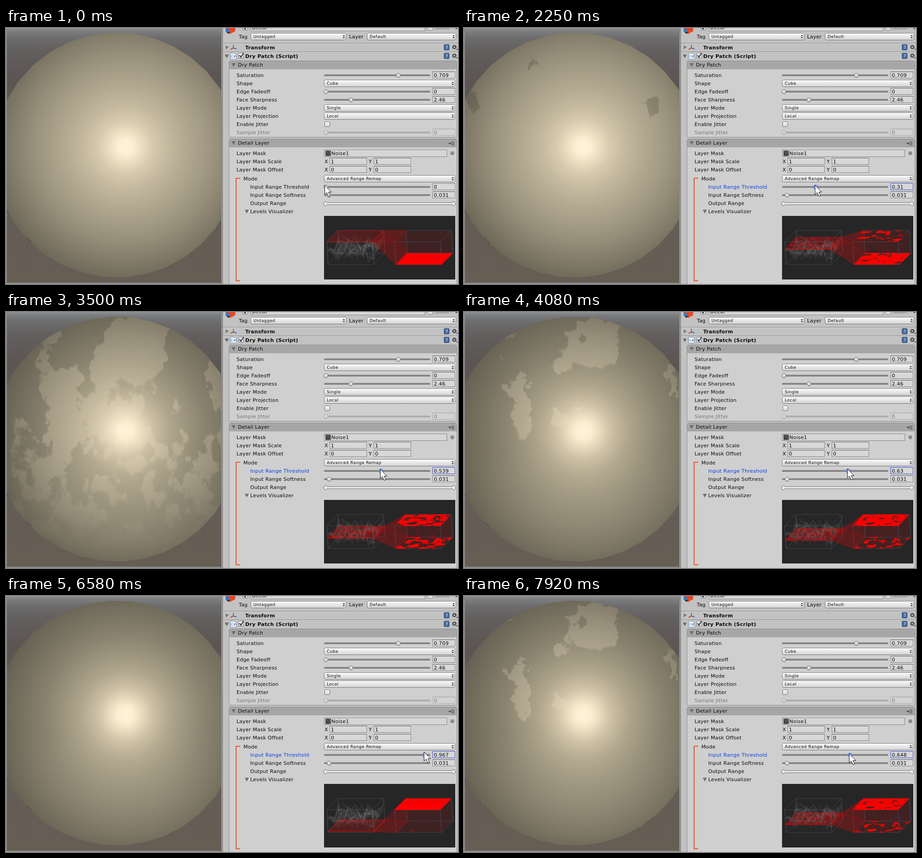
Recreate the animation shown at these times as an HTML page with a canvas. Size 992 by 564 pixels, loop 8 s.

```html
<!DOCTYPE html>
<html lang="en">
<head>
<meta charset="utf-8">
<title>Range remap inspector</title>
<style>
html, body { margin: 0; width: 100%; height: 100%; overflow: hidden; background: #c2c2c2; }
canvas, svg { position: absolute; left: 0; top: 0; }
#levels { left: 698px; top: 414px; }
text { font: 11px "DejaVu Sans", sans-serif; letter-spacing: .23px; fill: #0a0a0a; white-space: pre; }
.bold { font-weight: bold; letter-spacing: .3px; }
.mini { font-size: 9px; letter-spacing: .5px; }
.light { fill: #fff; }
.off { opacity: .45; }
.active text { fill: #0c3fdc; }
</style>
</head>
<body>
<canvas id="scene" width="474" height="564"></canvas>
<svg id="panel" width="992" height="564">
  <defs>
    <linearGradient id="btn" x2="0" y2="1"><stop stop-color="#fcfcfc"/><stop offset="1" stop-color="#d2d2d2"/></linearGradient>
    <linearGradient id="knob" x2="0" y2="1"><stop stop-color="#f6f6f6"/><stop offset="1" stop-color="#c4c4c4"/></linearGradient>
  </defs>
</svg>
<canvas id="levels" width="288" height="140"></canvas>
<script>
const $ = id => document.getElementById(id);
const clamp = (x, a = 0, b = 1) => Math.min(b, Math.max(a, x));
const mix = (a, b, k) => a + (b - a) * k;

// ---------- noise ----------
function hash(x, y) {
  const s = Math.sin(x * 127.1 + y * 311.7) * 43758.5453;
  return s - Math.floor(s);
}
function noise(x, y) {
  const i = Math.floor(x), j = Math.floor(y), u = x - i, v = y - j;
  const a = u * u * (3 - 2 * u), b = v * v * (3 - 2 * v);
  return mix(mix(hash(i, j), hash(i + 1, j), a), mix(hash(i, j + 1), hash(i + 1, j + 1), a), b);
}
function fbm(x, y) {
  let sum = 0;
  for (let o = 0, w = .5; o < 4; o++, w /= 2, x *= 2.1, y *= 2.1) sum += w * noise(x + o * 7, y);
  return sum / .9375;
}

// ---------- inspector ----------
const out = [];
const rect = (x, y, w, h, fill, stroke = 'none', r = 0) =>
  out.push(`<rect x="${x}" y="${y}" width="${w}" height="${h}" rx="${r}" fill="${fill}" stroke="${stroke}"/>`);
const path = (d, fill, stroke = 'none', w = 1) =>
  out.push(`<path d="${d}" fill="${fill}" stroke="${stroke}" stroke-width="${w}"/>`);
const text = (x, y, s, cls = '', id = '') => out.push(`<text id="${id}" class="${cls}" x="${x}" y="${y}">${s}</text>`);
const knob = (x, y, id = '') =>
  out.push(`<circle id="${id}" cx="${x}" cy="${y}" r="4.5" fill="url(#knob)" stroke="#5c5c5c"/>`);
const foldout = (x, y) => path(`M${x} ${y - 3.5}h9l-4.5 8z`, '#6c6c6c');

function field(x, y, w, value, id = '') {
  out.push(`<rect id="${id && id + 'Box'}" x="${x + .5}" y="${y - 7.5}" width="${w}" height="14" fill="#d8d8d8" stroke="#858585"/>`);
  if (!id) path(`M${x} ${y - 7.5}h${w + 1}`, 'none', '#5f5f5f');
  text(x + 3, y + 4, value, '', id);
}
function popup(x, y, w, label) {
  rect(x + .5, y - 7.5, w, 15, 'url(#btn)', '#777', 3);
  text(x + 6, y + 3, label, 'mini');
  const a = x + w - 7;
  path(`M${a} ${y - 1}h5l-2.5 -3zM${a} ${y + 1}h5l-2.5 3z`, '#333');
}
function slider(y, pos, value, id = '') {
  rect(698.5, y - 1, 232, 3, '#8e8e8e', '#686868', 1.5);
  path(`M699 ${y + 3}h231`, 'none', '#e4e4e4');
  knob(pos, y + .5, id && id + 'Knob');
  field(936, y, 49, value, id);
}
function group(y, h, label) {
  rect(489.5, y + .5, 500, h, '#cfcfcf', '#8c8c8c', 3);
  rect(490, y + 1, 499, 18, '#a6a6a6', 'none', 2);
  foldout(495, y + 9);
  text(509, y + 13, label);
}
function component(y, label) {
  path(`M476 ${y - 9.5}h516`, 'none', '#858585');
  path(`M476 ${y - 8.5}h516`, 'none', '#dadada');
  text(525, y + 4, label, 'bold');
  rect(961.5, y - 6.5, 11, 12, '#4a6c9c', '#243f66', 1);
  text(965, y + 3, '?', 'mini light');
  out.push(`<circle cx="984" cy="${y - 1}" r="3.6" fill="none" stroke="#444" stroke-width="2.6" stroke-dasharray="1.9 .93"/>`,
    `<circle cx="984" cy="${y - 1}" r="2.7" fill="none" stroke="#444" stroke-width="1.6"/>`);
  path(`M988 ${y + 3}h4l-2 2.5z`, '#333');
}
function checkbox(x, y, on) {
  rect(x + .5, y + .5, 11, 11, 'url(#btn)', '#717171', 2);
  if (on) path(`M${x + 2.5} ${y + 5}l3 4l6 -9`, 'none', '#1c2c48', 2);
}

function buildPanel() {
  rect(472, 0, 4, 564, '#9b9b9b');
  path('M472.5 0V564M475.5 0V564', 'none', '#777');
  rect(476, 0, 516, 564, '#c2c2c2');

  path('M482 0H503V7L492 13L482 8Z', '#e2492b');
  path('M482 0L490 4V12L482 8Z', '#3a78bd');
  path('M484 9h8l-4 4z', '#222');
  checkbox(519, -7, true);
  rect(537.5, -8.5, 382, 15, '#d6d6d6', '#858585');
  text(540, 3, 'Decal');
  rect(925.5, -5.5, 11, 11, 'url(#btn)', '#888', 2);
  text(941, 3, 'Static', 'off');
  path('M986 0h5l-2.5 3z', '#444');
  text(511, 23, 'Tag');
  popup(537, 19, 209, 'Untagged');
  text(753, 23, 'Layer');
  popup(792, 19, 195, 'Default');

  component(43, 'Transform');
  path('M482 38l7 4.5l-7 4.5z', '#7b7b7b');
  path('M499 44V37', 'none', '#3f9d2b', 2);
  path('M499 44L493 47', 'none', '#d8402c', 2);
  path('M499 44L506 46', 'none', '#2e62cf', 2);
  component(62, 'Dry Patch (Script)');
  foldout(480, 62);
  path('M492.5 55.5H502L505.5 59V68.5H492.5Z', '#f1f5f9', '#6f8ba8');
  out.push('<text x="493.5" y="65" style="font-size:7.5px;fill:#27639c;letter-spacing:0">C#</text>');
  checkbox(510, 55, true);

  group(72, 168, 'Dry Patch');
  ['Saturation', 'Shape', 'Edge Fadeoff', 'Face Sharpness', 'Layer Mode', 'Layer Projection', 'Enable Jitter']
    .forEach((s, i) => text(506, 108 + 18 * i, s));
  slider(104, 861, '0.709');
  popup(698, 122, 287, 'Cube');
  slider(140, 702, '0');
  slider(158, 757, '2.46');
  popup(698, 176, 287, 'Single');
  popup(698, 194, 287, 'Local');
  checkbox(699, 206, false);
  out.push('<g class="off">');
  text(506, 234, 'Sample Jitter');
  slider(230, 702, '0');
  out.push('</g>');

  group(244, 330, 'Detail Layer');
  path('M971 253h6l-3 3.5z', '#333');
  path('M977 251.5h7M977 254.5h7M977 257.5h7', 'none', '#333');
  ['Layer Mask', 'Layer Mask Scale', 'Layer Mask Offset'].forEach((s, i) => text(506, 280 + 18 * i, s));
  rect(698.5, 268.5, 269, 15, '#d6d6d6', '#858585');
  rect(701, 270, 12, 12, '#626262');
  for (let i = 0; i < 36; i++) rect(701 + i % 6 * 2, 270 + (i / 6 | 0) * 2, 2, 2, `rgba(30,30,30,${hash(i, 3) * .5})`);
  text(714, 280, 'Noise1');
  out.push('<circle cx="979.5" cy="276" r="3.5" fill="none" stroke="#333"/><circle cx="979.5" cy="276" r="1.2"/>');
  [[294, 1], [312, 0]].forEach(([y, v]) => {
    text(699, y + 4, 'X');
    field(710, y, 81, v);
    text(796, y + 4, 'Y');
    field(807, y, 81, v);
  });

  path('M514 331H505V557H514', 'none', '#e2582f', 2);
  text(521, 336, 'Mode');
  popup(698, 332, 287, 'Advanced Range Remap');
  out.push('<g id="label">');
  text(536, 354, 'Input Range Threshold');
  out.push('</g>');
  slider(350, 702, '0', 'threshold');
  text(536, 372, 'Input Range Softness');
  slider(368, 709, '0.031');
  text(536, 390, 'Output Range');
  rect(698.5, 384.5, 287, 5, '#e2e2e2', '#777', 2.5);
  path('M703 382.5H701Q697.5 382.5 697.5 387T701 391.5H703M981 382.5H983Q986.5 382.5 986.5 387T983 391.5H981', '#eee', '#5c5c5c');
  foldout(524, 404);
  text(536, 408, 'Levels Visualizer');
  out.push('<path id="cursor" d="M0 0V20L4.5 16L8.5 24.5L12 23L8.2 15H14.5Z" fill="#fff" stroke="#111" stroke-linejoin="round"/>');
  $('panel').insertAdjacentHTML('beforeend', out.join(''));
}

// ---------- sphere ----------
const W = 474, H = 564, MASK_H = 520;
const layer = () => Object.assign(document.createElement('canvas'), { width: W, height: H }).getContext('2d');
const scene = $('scene').getContext('2d');
const base = layer(), wet = layer();

function fillSphere(c, stops) {
  const g = c.createRadialGradient(262, 262, 0, 262, 262, 300);
  stops.forEach(([r, color]) => g.addColorStop(r / 300, color));
  c.fillStyle = g;
  c.beginPath();
  for (let i = 0; i < 36; i++) {
    const a = (i * 10 + 7) * Math.PI / 180;
    c.lineTo(243 + 270 * Math.sin(a), 280 - 270 * Math.cos(a));
  }
  c.fill();
}
const DRY = [[0, '#fff4d9'], [15, '#fdf0d4'], [32, '#eee2c5'], [60, '#d6caae'], [90, '#c5baa0'], [130, '#b4aa91'],
  [170, '#a59c86'], [210, '#958d78'], [250, '#837c6a'], [295, '#6d6858']];
const WET = [[0, '#fff4d9'], [18, '#fbeed1'], [38, '#e6dabd'], [60, '#cdc1a6'], [100, '#afa58c'], [140, '#9a927c'],
  [175, '#8a836f'], [210, '#7d7765'], [250, '#6f6a5a'], [295, '#605c4e']];

// x, y, radii and height of each bump in the wetness map
const BUMPS = [
  [285, 80, 64, 43, .23], [280, 83, 26, 9, .09], [300, 25, 55, 15, .2], [318, 30, 12, 6, .1], [205, 118, 20, 28, .14],
  [110, 163, 30, 26, .17], [127, 225, 22, 68, .16], [452, 140, 12, 32, .2], [464, 165, 12, 36, .2],
  [98, 54, 32, 14, .14], [80, 104, 18, 18, .14], [204, 240, 26, 20, .13], [250, 208, 12, 18, .12],
  [152, 75, 38, 38, -.25], [198, 33, 42, 22, -.2], [378, 80, 30, 38, -.18], [405, 148, 46, 38, -.2],
  [426, 212, 30, 50, -.2], [412, 175, 9, 13, -.18], [30, 160, 28, 48, -.2], [8, 165, 20, 55, -.15],
  [66, 95, 22, 20, -.13], [65, 234, 18, 38, -.18], [345, 232, 22, 38, -.15]
];
const wetness = new Float32Array(W * MASK_H);
const mask = wet.createImageData(W, MASK_H);

function buildSphere() {
  const sky = base.createLinearGradient(0, 0, 0, H);
  [[0, '#909395'], [.012, '#7b7d7f'], [.04, '#6d6c6c'], [.09, '#625f5e'], [.2, '#5b5553'], [.55, '#645c58'], [1, '#665d53']]
    .forEach(s => sky.addColorStop(...s));
  base.fillStyle = sky;
  base.fillRect(0, 0, W, H);
  fillSphere(base, DRY);
  base.strokeStyle = '#2d2b27';
  base.beginPath();
  base.moveTo(44, 461); base.lineTo(56, 473);
  base.moveTo(1, 402); base.lineTo(5, 405);
  base.stroke();
  base.fillStyle = '#8a8a8a';
  base.fillRect(0, 0, 2, H);
  base.fillRect(0, 561, W, 3);

  for (let y = 0, i = 0; y < MASK_H; y++) for (let x = 0; x < W; x++, i++) {
    const coarse = fbm(x / 26, y / 34) - .5, fine = fbm(x / 11, y / 15) - .5;
    const wx = x + fine * 34, wy = y + coarse * 34;
    let h = .54 + coarse * .18;
    for (const [bx, by, rx, ry, a] of BUMPS) {
      const d = ((wx - bx) / rx) ** 2 + ((wy - by) / ry) ** 2;
      if (d < 6) h += a * Math.exp(-d);
    }
    wetness[i] = h;
  }
}
function drawSphere(t) {
  for (let y = 0, i = 0; y < MASK_H; y++) {
    const fade = 255 * clamp((MASK_H - y) / 220);
    for (let x = 0; x < W; x++, i++) mask.data[i * 4 + 3] = fade * clamp((t - wetness[i]) / .02 + .5);
  }
  wet.globalCompositeOperation = 'source-over';
  wet.clearRect(0, 0, W, H);
  wet.putImageData(mask, 0, 0);
  wet.globalCompositeOperation = 'source-in';
  fillSphere(wet, WET);
  scene.drawImage(base.canvas, 0, 0);
  scene.drawImage(wet.canvas, 2, 0, 470, H, 2, 0, 470, H);
}

// ---------- levels visualizer ----------
const lv = $('levels').getContext('2d');
const NU = 60, NV = 24;
const height = (i, j) => clamp(.5 + (fbm(i / 7, j / 4 + 40) - .5) * 1.3 + (hash(i, j) - .5) * .1, .02, .98);
// u: left to right, v: front to back, p: top to bottom
const point = (x0, u, v, p) => [x0 + 100 * u + 24.5 * v + 3 * p, 57 + 50 * p - 25 * v];
const LEFT = 6, RIGHT = 155;

function poly(pts, fill, stroke) {
  lv.beginPath();
  pts.forEach(q => lv.lineTo(...q));
  lv.closePath();
  if (fill) { lv.fillStyle = fill; lv.fill(); }
  if (stroke) { lv.strokeStyle = stroke; lv.stroke(); }
}
const plane = (x0, p) => [[0, 0], [1, 0], [1, 1], [0, 1]].map(([u, v]) => point(x0, u, v, p));

function wireBox(x0) {
  const top = plane(x0, 0), bottom = plane(x0, 1), color = '#41434f';
  poly(top, null, color);
  poly(bottom, null, color);
  top.forEach((q, i) => poly([q, bottom[i]], null, color));
}
function drawLevels(t) {
  lv.fillStyle = '#262626';
  lv.fillRect(0, 0, 288, 140);
  lv.lineWidth = 1;
  const hi = t * .969, lo = hi + .031;

  poly([point(RIGHT, 0, 0, 0), point(RIGHT, 0, 1, 0), point(RIGHT, 1, 1, 0), point(RIGHT, 1, 1, 1),
    point(RIGHT, 1, 0, 1), point(RIGHT, 0, 0, 1)], 'rgba(255,0,0,.11)');
  wireBox(LEFT);
  wireBox(RIGHT);

  lv.strokeStyle = 'rgba(165,165,165,.26)';
  lv.lineWidth = .6;
  for (let j = 0; j <= NV; j++) {
    lv.beginPath();
    for (let i = 0; i <= NU; i++) lv.lineTo(...point(LEFT, i / NU, j / NV, 1 - height(i, j)));
    lv.stroke();
  }
  lv.lineWidth = 1;

  for (const [p, end] of [[hi, 0], [lo, 1]]) {
    poly(plane(LEFT, p), 'rgba(255,0,0,.1)', `rgba(235,0,0,${t ? .55 : .3})`);
    poly([point(LEFT, 1, 0, p), point(LEFT, 1, 1, p), point(RIGHT, 0, 1, end), point(RIGHT, 0, 0, end)],
      'rgba(255,0,0,.16)', 'rgba(225,0,0,.5)');
  }
  for (const v of [0, 1])
    poly([point(LEFT, 1, v, t), point(RIGHT, 0, v, 0), point(RIGHT, 0, v, 1)], 'rgba(255,0,0,.1)');

  lv.fillStyle = '#f00';
  for (let j = NV - 1; j >= 0; j--) for (let i = 0; i < NU; i++) {
    const h = height(i, j), near = Math.abs(h - t) < .05;
    const [x, y] = point(RIGHT, i / NU, j / NV, h < t ? 0 : 1);
    lv.fillRect(x, y - 1.1, 2.3, 1.4);
    if (near && hash(j, i) > .25) {
      const [a, b] = point(RIGHT, i / NU, j / NV, hash(i + 9, j));
      lv.globalAlpha = .7;
      lv.fillRect(a, b, 1, 1);
      lv.globalAlpha = 1;
    }
    const [sx, sy] = point(LEFT, i / NU, j / NV, t);
    if (near && t) lv.fillRect(sx, sy, 1, 1);
  }
}

// ---------- motion: ms, threshold, cursor y ----------
const KEYS = [[0, 0, 346], [417, 0, 346], [1500, .155, 345], [2917, .448, 347], [4083, .63, 345], [5000, .794, 345],
  [6000, .975, 343], [6333, .975, 343], [6583, .967, 343], [7167, .74, 345], [7917, .648, 347], [8000, .635, 347]];

function draw(tick) {
  const ms = Math.round(tick * 1000 / 12);
  const n = Math.max(1, KEYS.findIndex(k => k[0] >= ms));
  const [a, b] = [KEYS[n - 1], KEYS[n]];
  const k = (ms - a[0]) / (b[0] - a[0]);
  const t = +mix(a[1], b[1], k).toFixed(3), x = 702 + 224.3 * t, active = tick >= 6;
  drawSphere(t);
  drawLevels(t);
  $('threshold').textContent = t;
  $('thresholdBox').setAttribute('stroke', active ? '#3d50e6' : '#858585');
  $('thresholdKnob').setAttribute('cx', x);
  $('thresholdKnob').setAttribute('stroke', active ? '#3558dc' : '#5c5c5c');
  $('thresholdKnob').setAttribute('fill', active ? '#8fa6ea' : 'url(#knob)');
  $('label').setAttribute('class', active ? 'active' : '');
  $('cursor').setAttribute('transform', `translate(${Math.round(x) - (tick < 2 ? 2.5 : 1.5)} ${Math.round(mix(a[2], b[2], k)) + .5})`);
}

buildPanel();
buildSphere();
let last = -1;
function loop() {
  // 12 steps a second, on a clock that counts whole hundredths
  const tick = Math.floor((performance.now() + 5) % 8000 * 12 / 1000);
  if (tick !== last) draw(last = tick);
  requestAnimationFrame(loop);
}
loop();
</script>
</body>
</html>
```
